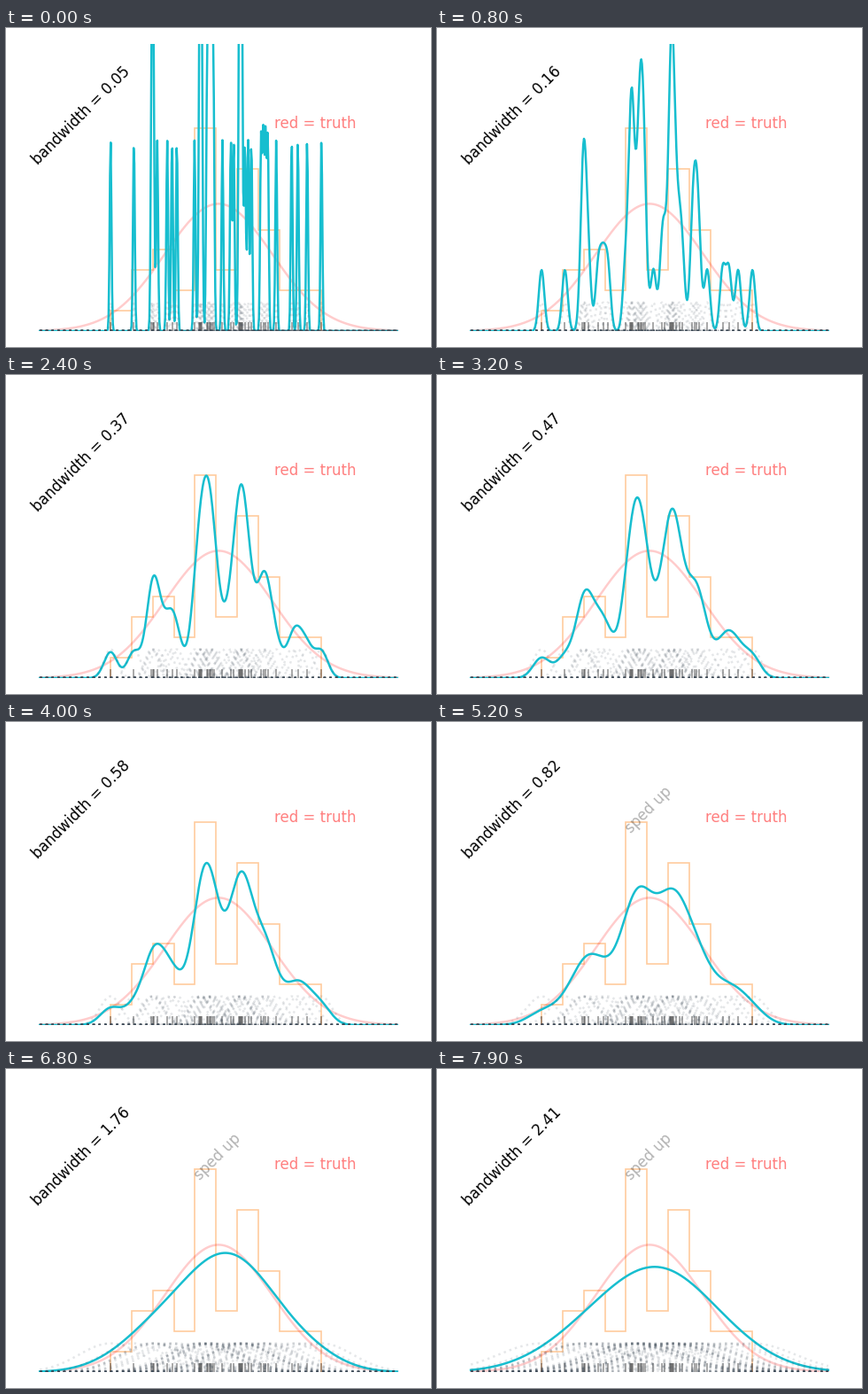
Animation of 480 by 360 pixels, one loop 8000 ms. Source, as a matplotlib script:

```python
import numpy as np
import matplotlib.pyplot as plt
from matplotlib.animation import FuncAnimation

plt.rcParams["font.family"] = "DejaVu Sans"
W, H, DPI = 480, 360, 120
SLOW, FAST = 50, 40

# Evenly spaced runs of samples: first, last, count
runs = [(-6.04, -3.43, 3), (-3.75, -3.63, 3), (-2.87, -2.33, 3),
        (-1.34, 0.22, 2), (-1.07, -0.93, 4), (-0.65, -0.27, 6),
        (0.69, 0.85, 2), (1.15, 1.32, 5), (1.48, 1.84, 3),
        (2.38, 2.76, 4), (3.23, 4.96, 3), (4.44, 5.76, 2)]
samples = np.sort(np.concatenate([np.linspace(*run) for run in runs]))
grid = np.linspace(-10, 10, 500)
widths = np.concatenate([np.linspace(0.05, 0.7, SLOW),
                         np.linspace(0.7, 3, FAST)])


def bell(x, mu, sigma):
    return np.exp(-0.5 * ((x - mu) / sigma) ** 2)


def density(x, mu, sigma):
    return bell(x, mu, sigma) / (sigma * np.sqrt(2 * np.pi))


fig = plt.figure(figsize=(W / DPI, H / DPI), dpi=DPI, facecolor="white")
ax = fig.add_axes([18 / W, 18 / H, 444 / W, 324 / H])
ax.set(xlim=(-11, 11), ylim=(0, 0.3))
ax.axis("off")


def label(x, y, text, **style):
    return fig.text(x / W, 1 - y / H, text, fontsize=10,
                    rotation_mode="anchor", **style)


ax.hist(samples, bins=10, density=True, histtype="step",
        color="tab:orange", alpha=0.4, lw=1, zorder=1)
ax.plot(grid, density(grid, 0, 3), color="red", alpha=0.2, lw=1.5, zorder=2)
ax.vlines(samples, 0, 0.009, color="black", alpha=0.4, lw=1, zorder=3)
estimate, = ax.plot(grid, 0 * grid, color="tab:cyan", lw=1.5, zorder=4)
bumps = [ax.plot(grid, 0 * grid, ":", color="#3d4a57", alpha=0.13, lw=1.5,
                 zorder=5)[0] for _ in samples]

label(303, 113, "red = truth", color="red", alpha=0.5)
readout = label(36, 155, "", color="black", rotation=45)
hint = label(219.5, 126.5, "sped up", color="black", alpha=0.3, rotation=45)


def update(i):
    h = widths[i]
    estimate.set_ydata(density(grid[:, None], samples, h).mean(axis=1))
    for bump, mu in zip(bumps, samples):
        bump.set_ydata(0.03 * bell(grid, mu, h))
    readout.set_text(f"bandwidth = {h:.2f}")
    hint.set_visible(i >= SLOW)
    return [estimate, *bumps, readout, hint]


anim = FuncAnimation(fig, update, frames=80, interval=100,
                     repeat=True, repeat_delay=0, blit=False)
plt.show()
```
